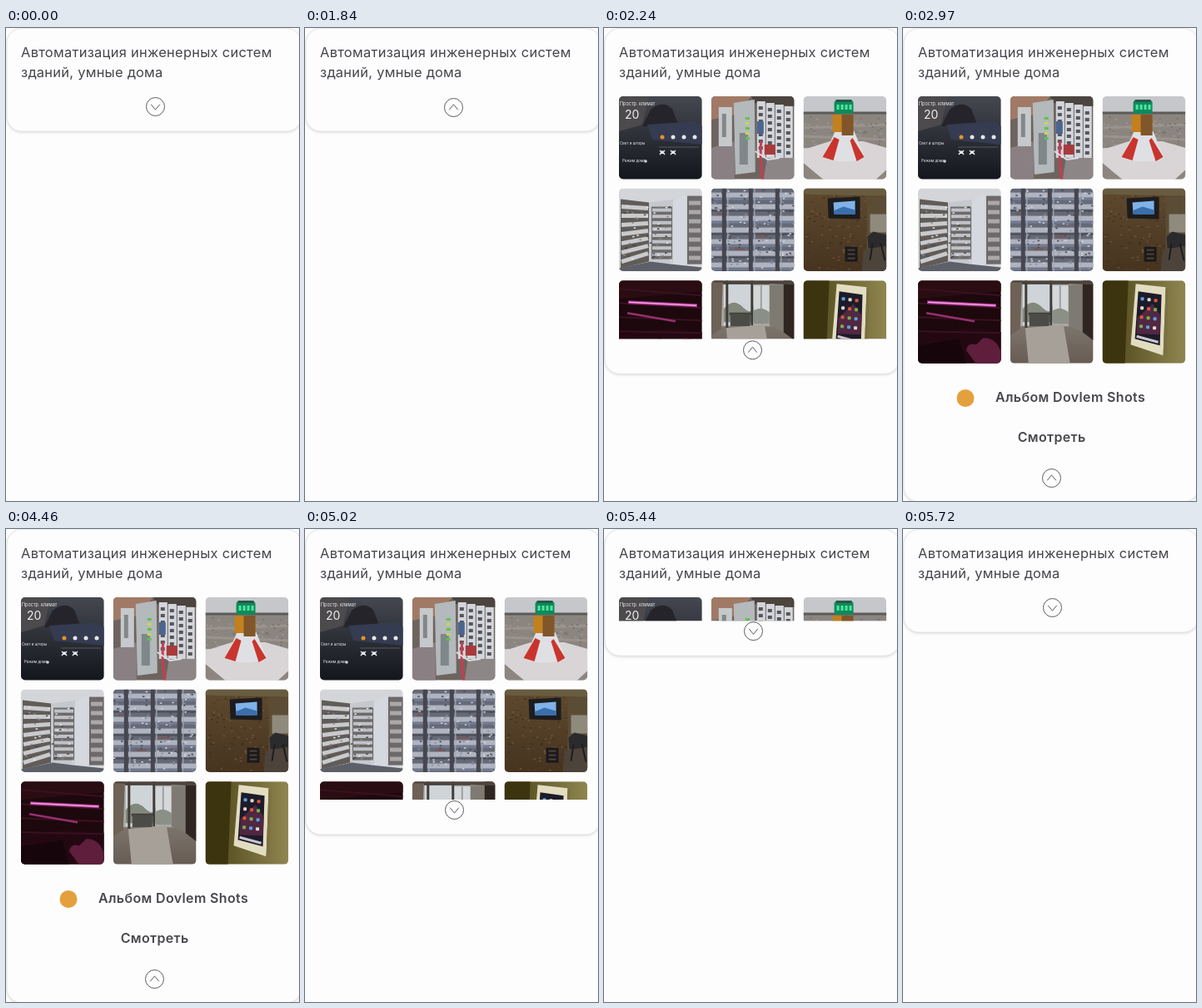
Write an HTML page that moves like this. It is 352 by 568 pixels and loops after 7.28 s.

```html
<!DOCTYPE html>
<html lang="ru">
<head>
<meta charset="utf-8">
<style>
html, body { margin: 0; width: 100%; height: 100%; overflow: hidden; background: #fdfdfd; }
svg { display: block; width: 352px; height: 568px; }
text { font-family: Inter, "Open Sans", sans-serif; }
.title { font-size: 16.5px; letter-spacing: .25px; fill: #45454c; }
.bold { font-size: 16px; font-weight: 600; letter-spacing: .35px; fill: #47474e; }
#card { filter: drop-shadow(0 1px 1.5px rgba(90, 90, 100, .22)); }
</style>
</head>
<body>
<svg id="stage" viewBox="0 0 352 568"></svg>
<script>
const LOOP = 7280, OPEN_AT = 1840, CLOSE_AT = 4760, DURATION = 1000;
const TOP = 82, FULL = 445;
// Short pauses in the motion: [from, to]
const HOLDS = [[1840, 1940], [2540, 2640], [5180, 5280], [5460, 5560]];

const rect = (x, y, w, h, fill, extra = '') =>
  `<rect x="${x}" y="${y}" width="${w}" height="${h}" fill="${fill}" ${extra}/>`;
const shape = (d, fill) => `<path d="${d}" fill="${fill}"/>`;
const line = (d, color, width = 1) =>
  `<path d="${d}" fill="none" stroke="${color}" stroke-width="${width}"/>`;
const label = (x, y, size, s) =>
  `<text x="${x}" y="${y}" font-size="${size}" fill="#eee">${s}</text>`;
const times = (n, draw) => Array.from({ length: n }, (_, i) => draw(i)).join('');
const fade = (id, from, to, dir = 'x2="0" y2="1"') =>
  `<linearGradient id="${id}" ${dir}><stop stop-color="${from}"/><stop offset="1" stop-color="${to}"/></linearGradient>`;

let seed = 7;
const random = () => (seed = seed * 16807 % 2147483647) / 2147483647;
// Small scattered marks inside a box
const grain = (n, x, y, w, h, size, colors) => times(n, i =>
  rect((x + random() * w).toFixed(1), (y + random() * h).toFixed(1), size, size * .6, colors[i % colors.length]));

const climate = () => rect(0, 0, 100, 100, 'url(#night)') +
  shape('M0 0H36L28 34 0 42Z', '#4c4a4c') +
  shape('M28 36 38 16Q52 4 64 15L72 36Z', '#25242a') +
  shape('M34 34 92 30 100 36V58L40 52Z', '#353b50') +
  label(1, 11, 5.5, 'Простр. климат') + label(7, 27, 14, '20') +
  label(1, 58, 4.5, 'Свет и шторы') + label(4, 79, 4.5, 'Режим дома') +
  times(4, i => `<circle cx="${52 + i * 13}" cy="49" r="2.5" fill="${i ? '#e6e6e6' : '#e8922c'}"/>`) +
  times(2, i => line(`M${49 + i * 13} 70l3-4 3 4M${49 + i * 13} 65l3 3 3-3`, '#eee', 1.4)) +
  line('M48 61H96', '#777', .6) + `<circle cx="32" cy="78" r="1.8" fill="#ccc"/>`;

const modules = () => rect(0, 0, 100, 100, '#6e645f') +
  shape('M0 0H48L30 22 0 28Z', '#a07a66') + shape('M48 0H100V12L52 8Z', '#4c443f') +
  shape('M0 62 28 54V100H0Z', '#8a8083') +
  rect(9, 13, 16, 47, '#c6c9cb') + rect(13, 21, 5, 28, '#82878a') +
  shape('M27 8 52 4 53 91 29 94Z', '#b4b9bb') + rect(34, 44, 10, 38, '#7f878b') +
  times(5, i => rect(41, 25 + i * 6, 5, 3, i % 2 ? '#c9d455' : '#5fc24c')) +
  times(4, i => rect(55 + i * 11, 6 + i * 2, 10, 68, '#d3d5da') +
    times(7, j => rect(57 + i * 11, 12 + j * 8 + i * 2, 5, 4, '#55575f'))) +
  rect(55, 30, 8, 15, '#4b6590') + rect(64, 58, 13, 12, '#a83a3c') +
  shape('M67 74H100V100H63Z', '#8d8687') +
  line('M60 54Q58 72 62 100', '#c83c50', 3) + line('M53 66 68 76 82 74', '#dedee0', 2);

const beacon = () => rect(0, 0, 100, 100, '#c6c7cb') +
  rect(0, 19, 100, 43, '#8b8580') + line('M0 20H100', '#5d5b58', 3) +
  line('M0 38 100 34M0 48 100 52', '#9a938c', 3) +
  grain(60, 0, 24, 98, 36, 2.5, ['#78716c', '#a09993']) +
  shape('M0 64 32 54H72L100 62V100H0Z', '#d9d5d6') +
  shape('M0 80 24 100H0ZM87 100 100 88V100Z', '#8d8580') +
  shape('M38 42H61L74 74Q49 83 24 74Z', '#dfe0e4') +
  shape('M37 49 43 52 36 77 23 73ZM59 50 73 73 64 78 56 53Z', '#c9352d') +
  rect(35, 22, 25, 21, '#c2801f') + rect(46, 22, 14, 25, '#80562a') +
  rect(37, 5, 23, 16, '#0f8a5a', 'rx="3"') +
  times(4, i => rect(40 + i * 5, 10, 3, 6, '#50e5a1')) + rect(39, 4, 19, 3, '#23594a');

const cabinet = () => rect(0, 0, 100, 100, '#d3d5d8') +
  shape('M2 13 36 17V88L2 96Z', '#615c58') +
  times(7, i => line(`M3 ${22 + i * 11}L35 ${24 + i * 9}`, '#c9cacd', 5)) +
  shape('M36 17 68 13V88L36 95Z', '#c5c8cd') + rect(39, 22, 25, 63, '#6d6a6a') +
  times(8, i => rect(40, 24 + i * 7.6, 23, 4, '#bfc2c8')) +
  grain(50, 4, 20, 58, 66, 2.5, ['#4c4644', '#8d8888', '#e4e5e8']) +
  shape('M65 14 80 8V98L65 90Z', '#d5d9df') + rect(82, 9, 18, 82, '#6d6869') +
  times(7, i => rect(84, 15 + i * 11, 14, 5, '#aaa8ab')) +
  shape('M0 96 38 88 62 91 100 95V100H0Z', '#5d5f69');

const rails = () => rect(0, 0, 100, 100, '#666a77') +
  times(7, i => rect(0, 5 + i * 14, 100, 6, '#b0b4c0') +
    line(`M0 ${13 + i * 14}H100`, i % 2 ? '#4a4c57' : '#77809c', 2)) +
  grain(150, 0, 0, 98, 98, 2.5, ['#474a55', '#cdd1da', '#858da4']) +
  times(3, i => rect(13 + i * 32, 0, 5, 100, '#454650') +
    line(`M${20 + i * 32} 0V100`, '#a4a9b6', 1.2)) +
  line('M6 31H12M54 58H68M28 73H40', '#7d5350', 2);

const wall = () => rect(0, 0, 100, 100, 'url(#brick)') +
  grain(130, 0, 8, 76, 90, 2.5, ['#40301f', '#6d5337', '#523c25']) +
  shape('M0 0H100V9L0 7Z', '#685c40') + shape('M76 10H100V100H76Z', '#5b4c36') +
  shape('M80 31H100V53H80Z', '#8f8a7c') + shape('M77 58 84 52 100 56V72H78Z', '#2b2a2d') +
  shape('M72 74 100 69V100H70Z', '#4c443a') + line('M83 66 80 86M93 66 98 87', '#1d1c1f', 2) +
  shape('M29 12 68 10V37L30 36Z', '#1d1c1e') + shape('M36 17 62 15V31L37 31Z', '#7fb2e8') +
  shape('M36 27 48 22 62 26V31H37Z', '#3a6fae') +
  rect(50, 70, 15, 18, '#1c191b') + times(3, i => rect(53, 73 + i * 5, 9, 2, '#4a423c'));

const neon = () => rect(0, 0, 100, 100, '#1c080d') +
  shape('M0 0H100V13L0 22Z', '#2a0d12') + shape('M0 65 58 57 100 62V100H0Z', '#230812') +
  times(4, i => line(`M0 ${10 + i * 17}L100 ${18 + i * 15}`, '#3a1020', 2)) +
  line('M11 26 94 30', '#a8328c', 4) + line('M12 26 93 30', '#f0a8e4', 1.5) +
  line('M10 39 68 49', '#96306e', 2.5) +
  shape('M58 84Q59 74 70 77L78 69Q95 68 100 88V100H70Z', '#5e1e3c') +
  shape('M0 78 50 70 58 100H0Z', '#16060c');

const hall = () => rect(0, 0, 100, 100, 'url(#floor)') +
  rect(0, 0, 100, 55, '#a9a8a4') + shape('M0 0H14L12 58 0 66Z', '#6e6156') +
  rect(15, 4, 36, 50, '#cfd4d8') + shape('M15 34Q26 20 38 32T51 28V50H15Z', '#82887c') +
  line('M19 0V57M49 0V54M14 3H70M22 40H49', '#403c38', 3) +
  rect(23, 40, 24, 15, '#4b4b48') + rect(51, 6, 19, 46, '#d5d8da') +
  line('M60 6V52', '#9da09d', 2) + shape('M51 36Q60 30 70 38V52H51Z', '#8b9087') +
  shape('M70 5H88V62L70 54Z', '#7e7a72') + shape('M87 0H100V72L87 62Z', '#2f2621') +
  shape('M0 0H100V5L0 2Z', '#4e453d') + shape('M18 57 64 53 72 100H22Z', '#a7a098');

const tablet = () => rect(0, 0, 100, 100, 'url(#plaster)') +
  shape('M0 0H31L27 100H0Z', '#3b340f') +
  shape('M40 4 76 8 73 90 34 77Z', '#e2ddc0') + shape('M73 90 76 8 79 11 77 91Z', '#7a7040') +
  shape('M43 13 71 17 69 78 39 70Z', '#1d1b2a') + shape('M42 45 60 28 70 42 69 65 41 64Z', '#512742') +
  times(4, i => times(3, j =>
    rect(46 + j * 8 - i * .5, 20 + i * 11 + j, 4, 4, ['#5aa0e0', '#ddd8ca', '#d6583c', '#74b04e'][(i + j) % 4], 'rx="1"'))) +
  line('M41 67 67 74', '#c7c4ce', 3);

const photos = [climate, modules, beacon, cabinet, rails, wall, neon, hall, tablet];
const gallery = photos.map((draw, i) => {
  const x = 18 + (i % 3) * 110.8, y = TOP + Math.floor(i / 3) * 110.6;
  return `<g transform="translate(${x} ${y})" clip-path="url(#tile)">${draw()}</g>`;
}).join('');

const stage = document.getElementById('stage');
stage.innerHTML = `
  <defs>
    ${fade('night', '#454850', '#14161e')}
    ${fade('brick', '#5f4a2f', '#46331f')}
    ${fade('floor', '#989188', '#665c54')}
    ${fade('plaster', '#4a4218', '#8f8650', '')}
    <clipPath id="tile"><rect width="99.6" height="99.4" rx="5"/></clipPath>
    <clipPath id="fold"><rect id="window" y="${TOP}" width="352" height="0"/></clipPath>
  </defs>
  <rect width="352" height="568" fill="#fdfdfd"/>
  <rect id="card" x="1" y=".5" width="354" rx="18" fill="#fdfdfd" stroke="#e6e6e8"/>
  <text class="title" x="18" y="35">Автоматизация инженерных систем</text>
  <text class="title" x="18" y="59">зданий, умные дома</text>
  <g clip-path="url(#fold)">
    ${gallery}
    <circle cx="75" cy="444.5" r="10.5" fill="#e4a03c"/>
    <text class="bold" x="111" y="449">Альбом Dovlem Shots</text>
    <text class="bold" x="178.7" y="497" text-anchor="middle">Смотреть</text>
  </g>
  <g id="arrow" fill="none" stroke="#5c5c64">
    <circle cx=".5" cy="-.5" r="11"/>
    <path d="M-4.8-3.3 .5 3.2 5.8-3.3"/>
  </g>`;

const card = document.getElementById('card');
const fold = document.getElementById('window');
const arrow = document.getElementById('arrow');

// cubic-bezier(.25, .1, .25, 1)
function ease(x) {
  if (x <= 0) return 0;
  if (x >= 1) return 1;
  const curve = (a, b, u) => 3 * a * u * (1 - u) ** 2 + 3 * b * u * u * (1 - u) + u ** 3;
  let lo = 0, hi = 1;
  for (let i = 0; i < 24; i++) {
    const mid = (lo + hi) / 2;
    if (curve(.25, .25, mid) < x) lo = mid; else hi = mid;
  }
  return curve(.1, 1, lo);
}

function render(ms) {
  const hold = HOLDS.find(([from, to]) => ms >= from && ms < to);
  const t = hold ? hold[0] : ms;
  const open = t >= OPEN_AT && t < CLOSE_AT;
  const shown = t < CLOSE_AT
    ? ease((t - OPEN_AT - 20) / DURATION)
    : 1 - ease((t - CLOSE_AT + 10) / DURATION);
  const h = FULL * (t >= 5720 ? 0 : shown);
  fold.setAttribute('height', h);
  card.setAttribute('height', 123.5 + h);
  arrow.setAttribute('transform', `translate(179 ${95 + h}) rotate(${open ? 180 : 0})`);
}

const start = performance.now();
function tick(now) {
  render(Math.max(0, now - start) % LOOP);
  requestAnimationFrame(tick);
}
render(0);
requestAnimationFrame(tick);
</script>
</body>
</html>
```
